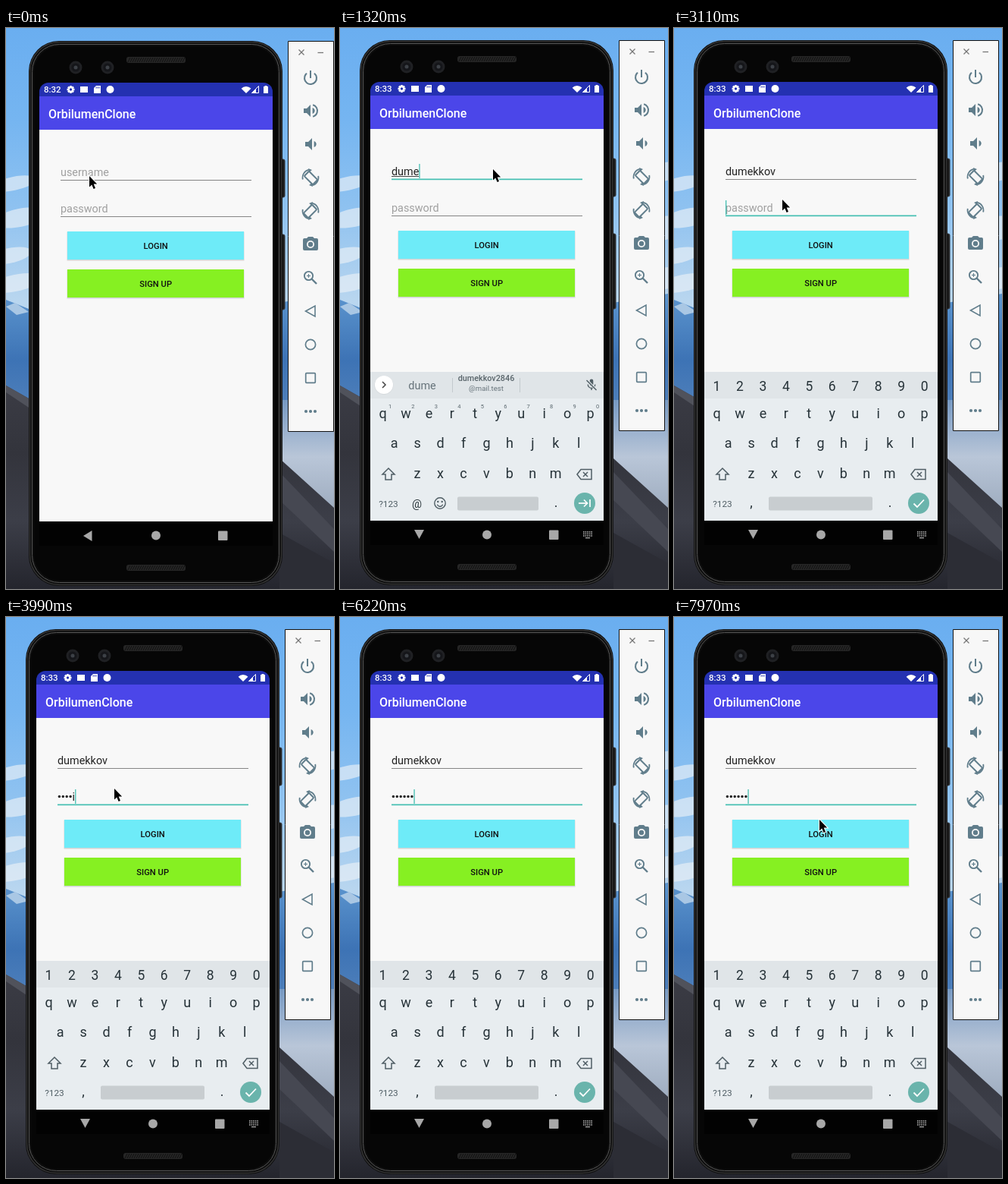
An HTML page with a canvas for the animation above (8000 ms loop, 433x739 px).

```html
<!DOCTYPE html>
<html lang="en">
<head>
<meta charset="utf-8">
<title>Login demo</title>
<style>
  html, body { margin: 0; width: 100%; height: 100%; overflow: hidden; background: #000; }
  canvas { display: block; width: 433px; height: 739px; }
</style>
</head>
<body>
<canvas id="stage"></canvas>
<script>
const W = 433, H = 739, LOOP = 8000;
const canvas = document.getElementById('stage');
const c = canvas.getContext('2d');
const ratio = window.devicePixelRatio || 1;
canvas.width = W * ratio;
canvas.height = H * ratio;

const TITLE = 'OrbilumenClone', USER = 'dumekkov', MAIL = ['dumekkov2846', '@mail.test'];
const TEAL = '#45bfb2', SLATE = '#607d8b', INK = '#263238', KEY = '#4f5d64';

// Each step holds until the next one; values carry over.
const steps = [
  { at: 0, cursor: [110, 195], typed: 0, dots: 0, char: '', focus: '', keys: '', caret: false },
  { at: 150, cursor: [178, 381] },
  { at: 290, cursor: [361, 661] },
  { at: 590, cursor: [366, 690] },
  { at: 740, cursor: [374, 719] },
  { at: 880, cursor: null },
  { at: 1320, cursor: [202, 186], typed: 4, focus: 'user', keys: 'text', caret: true },
  { at: 1620, typed: 5 },
  { at: 1770, typed: 7 },
  { at: 1910, typed: 8 },
  { at: 2210, cursor: [190, 196] },
  { at: 2360, cursor: [157, 218], caret: false },
  { at: 2510, cursor: [143, 229] },
  { at: 2660, cursor: [143, 226], focus: 'pass', caret: true },
  { at: 3110, keys: 'pass' },
  { at: 3260, caret: false },
  { at: 3550, char: 'r', caret: true },
  { at: 3700, dots: 2, char: 'e' },
  { at: 3850, dots: 3, char: 'v' },
  { at: 3990, dots: 4, char: 'i' },
  { at: 4290, dots: 5, char: 'd' },
  { at: 4730, cursor: [147, 236], caret: false },
  { at: 4880, cursor: [160, 258] },
  { at: 5030, cursor: [175, 276], caret: true },
  { at: 5180, cursor: [183, 283] },
  { at: 5770, dots: 6, char: '' },
  { at: 6070, cursor: [258, 262], caret: false },
  { at: 6220, cursor: null, caret: true },
  { at: 6660, cursor: [410, 319], caret: false },
  { at: 6810, cursor: [262, 284] },
  { at: 6950, cursor: [192, 267], caret: true },
  { at: 7400, caret: false },
  { at: 7850, caret: true }
];
const stateAt = t => Object.assign({}, ...steps.filter(s => s.at <= t));

function rect(x, y, w, h, fill) {
  c.fillStyle = fill;
  c.fillRect(x, y, w, h);
}
function round(x, y, w, h, r, fill, stroke, lw = 1) {
  c.beginPath();
  c.roundRect(x, y, w, h, r);
  if (fill) { c.fillStyle = fill; c.fill(); }
  if (stroke) { c.strokeStyle = stroke; c.lineWidth = lw; c.stroke(); }
}
function disc(x, y, r, fill) {
  c.beginPath();
  c.arc(x, y, r, 0, 7);
  c.fillStyle = fill;
  c.fill();
}
function arc(x, y, r, from, to, color, lw) {
  c.beginPath();
  c.arc(x, y, r, from, to);
  c.strokeStyle = color;
  c.lineWidth = lw;
  c.stroke();
}
function trace(pts, x = 0, y = 0, close = false) {
  c.beginPath();
  for (let i = 0; i < pts.length; i += 2) c.lineTo(x + pts[i], y + pts[i + 1]);
  if (close) c.closePath();
}
function poly(pts, fill, x, y) {
  trace(pts, x, y, true);
  c.fillStyle = fill;
  c.fill();
}
function line(pts, color, lw, x, y, close) {
  trace(pts, x, y, close);
  c.strokeStyle = color;
  c.lineWidth = lw;
  c.stroke();
}
function text(s, x, y, size, color, align = 'left', weight = 400) {
  c.font = `${weight} ${size}px Roboto, sans-serif`;
  c.textAlign = align;
  c.fillStyle = color;
  c.fillText(s, x, y);
  return c.measureText(s).width;
}
function blend(y0, y1, ...stops) {
  const g = c.createLinearGradient(0, y0, 0, y1);
  stops.forEach((s, i) => g.addColorStop(i / (stops.length - 1), s));
  return g;
}
function at(x, y, angle, draw) {
  c.save();
  c.translate(x, y);
  c.rotate(angle);
  draw();
  c.restore();
}

function drawBackdrop() {
  rect(0, 0, W, H, blend(0, 360, '#6aaef0', '#75b5f1', '#8fc2f0', '#b9d6ef'));
  const clouds = [10, 205, 30, 9, 18, 250, 34, 12, 4, 300, 30, 10, 12, 336, 36, 11,
    425, 190, 40, 12, 420, 265, 40, 16, 428, 330, 40, 14];
  c.fillStyle = 'rgba(235,241,247,.65)';
  for (let i = 0; i < clouds.length; i += 4) {
    c.beginPath();
    c.ellipse(clouds[i], clouds[i + 1], clouds[i + 2], clouds[i + 3], -0.2, 0, 7);
    c.fill();
  }
  poly([0, 358, 30, 370, 200, 390, 360, 362, 433, 350, 433, 600, 0, 600], blend(355, 520, '#5a93cd', '#3d73b5', '#5584bc'));
  poly([0, 367, 12, 362, 30, 374, 14, 378], '#a9c7e4');
  rect(350, 490, 83, 160, blend(490, 640, '#7799c2', '#b9c6d8', '#9caabd'));
  poly([0, 471, 30, 488, 120, 540, 300, 540, 361, 567, 433, 632, 433, 739, 0, 739],
    blend(470, 739, '#3b3c45', '#33343c', '#3c3e48', '#24252d'));
  poly([0, 471, 30, 488, 30, 500, 0, 480], '#50525b');
  poly([361, 585, 433, 660, 433, 690, 361, 622], '#464852');
  poly([361, 665, 433, 705, 433, 739, 361, 739], '#2c2d35');
}

function drawPhone() {
  for (const [y, h] of [[172, 50], [271, 99]]) round(358, y, 6, h, 2, '#1b1b1b', '#3a3a3a');
  round(26, 16, 335, 718, 40, '#0d0d0d');
  round(27.5, 17.5, 332, 715, 39, null, '#343434', 1.5);
  round(30.5, 20.5, 326, 709, 36, null, '#565656', 1);
  round(33, 23, 321, 704, 34, '#060606');
  for (const y of [37, 706]) {
    round(155, y, 78, 8, 3, '#262626');
    for (let x = 157; x < 232; x += 3) line([x, y + 7, x + 3, y + 1], '#101010', 1);
  }
  for (const x of [88, 130]) {
    disc(x, 51, 8.5, '#202124');
    disc(x, 51, 5.5, '#15161a');
    disc(x, 51, 2.5, '#3d4147');
  }
}

function drawStatus(clock) {
  round(40, 71, 308, 30, [12, 12, 0, 0], '#2431b1');
  rect(40, 89, 308, 44, '#4b46e9');
  text(clock, 46, 84, 11.5, '#fff', 'left', 500);
  for (let i = 0; i < 8; i++) at(81.5, 80, i * Math.PI / 4, () => rect(-1.3, -5, 2.6, 3, '#fff'));
  arc(81.5, 80, 2.7, 0, 7, '#fff', 2);
  rect(94, 76, 10, 8, '#fff');
  poly([115, 75, 121, 75, 121, 85, 112, 85, 112, 78], '#fff');
  for (const x of [115, 117, 119]) rect(x - .4, 76.5, 1, 2, '#2431b1');
  disc(133.5, 80, 5, '#fff');
  c.beginPath();
  c.moveTo(313, 85);
  c.arc(313, 85, 9, -2.36, -0.78);
  c.fillStyle = '#fff';
  c.fill();
  line([320.5, 84.5, 329.5, 84.5, 329.5, 75.5], '#fff', 1, 0, 0, true);
  poly([320, 85, 326, 85, 326, 79], '#fff');
  rect(336, 76, 6, 9, '#fff');
  rect(337.5, 75, 3, 1, '#fff');
  text(TITLE, 52, 118, 16, '#fff', 'left', 500);
}

function field(y, focused) {
  rect(68, focused ? y - .5 : y, 252, focused ? 1.7 : 1, focused ? TEAL : '#858585');
}
function button(label, y, fill) {
  rect(76.5, y + .5, 234, 38, '#d2d5d6');
  rect(77, y, 233, 37, fill);
  text(label, 193.7, y + 23, 11.2, '#111', 'center', 500);
}

function drawForm(s) {
  rect(40, 133, 308, 516, '#f8f8f8');
  const name = USER.slice(0, s.typed);
  const w = text(name || 'username', 68, 193.5, 14.4, name ? '#222' : '#a0a0a0');
  field(199, s.focus === 'user');
  if (s.focus === 'user') {
    rect(68, 195, w, 1, '#444');
    if (s.caret) rect(68 + w, 179, 1.3, 19, TEAL);
  }
  let x = 68;
  if (s.dots || s.char) {
    for (let i = 0; i < s.dots; i++) disc(70.4 + i * 4.9, 236.5, 1.7, '#222');
    x += s.dots * 4.9;
    if (s.char) x += text(s.char, x, 241.5, 14.4, '#222');
  } else {
    text('password', 68, 241.5, 14.4, '#a0a0a0');
  }
  field(247, s.focus === 'pass');
  if (s.focus === 'pass' && s.caret) rect(x, 227, 1.3, 19, TEAL);
  button('LOGIN', 267, '#6eebf8');
  button('SIGN UP', 317, '#86f022');
}

function letters(row, x, y, size = 18) {
  [...row].forEach((k, i) => text(k, x + i * 30.45, y, size, INK, 'center'));
}

function drawSuggestions(s) {
  disc(58, 470.5, 12.5, '#d5dadd');
  disc(58, 470, 12, '#fff');
  line([56, 466, 60, 470, 56, 474], '#444', 1.5);
  text(USER.slice(0, s.typed), 108.5, 476, 14.4, '#66737a', 'center');
  rect(148, 461, 1, 19, '#c3c9cd');
  rect(237, 461, 1, 19, '#c3c9cd');
  text(MAIL[0], 193, 465, 10.8, '#59656b', 'center', 500);
  text(MAIL[1], 193, 478, 9.6, '#66737a', 'center');
  round(329.7, 462.5, 4.6, 9, 2.3, KEY);
  arc(332, 469.5, 4.8, 0, Math.PI, KEY, 1.3);
  rect(331.3, 474, 1.4, 3, KEY);
  line([326, 464, 339, 477], '#e0e5e8', 3);
  line([325.5, 464, 338.5, 477], KEY, 1.4);
}

function drawKeyboard(s) {
  const plain = s.keys === 'text';
  rect(40, 453, 308, 196, '#e8edf0');
  rect(40, 453, 308, 35, '#e0e5e8');
  if (plain) drawSuggestions(s);
  else letters('1234567890', 56.5, 477.5, 17.5);
  letters('qwertyuiop', 56.5, 514);
  if (plain) [...'1234567890'].forEach((k, i) => text(k, 66 + i * 30.45, 501, 7.5, '#59666d', 'center'));
  letters('asdfghjkl', 71.7, 553);
  letters('zxcvbnm', 102, 593);
  line([64, 580, 72, 588, 68, 588, 68, 595, 60, 595, 60, 588, 56, 588], KEY, 1.5, 0, 0, true);
  line([313, 588, 318, 581.5, 332, 581.5, 332, 594.5, 318, 594.5], KEY, 1.5, 0, 0, true);
  line([321, 585, 327, 591], KEY, 1.5);
  line([327, 585, 321, 591], KEY, 1.5);
  text('?123', 64, 630.5, 11.8, KEY, 'center');
  if (plain) {
    text('@', 101.5, 631.5, 14.5, INK, 'center');
    arc(132, 626, 7.2, 0, 7, KEY, 1.4);
    disc(129.3, 624, 1.2, KEY);
    disc(134.7, 624, 1.2, KEY);
    arc(132, 626.5, 3.8, 0.3, 2.84, KEY, 1.4);
  } else {
    text(',', 102, 631, 18, INK, 'center');
  }
  const left = plain ? 155 : 125;
  round(left, 617.5, 262 - left, 18, 2, '#c8cdd0');
  text('.', 285, 631, 18, INK, 'center');
  disc(323, 626, 14, '#6ab4ac');
  if (plain) {
    line([315, 626, 326, 626], '#fff', 1.7);
    line([322, 621.5, 326.5, 626, 322, 630.5], '#fff', 1.7);
    line([330, 621, 330, 631], '#fff', 1.7);
  } else {
    line([316.5, 626.5, 321, 631, 330, 621.5], '#fff', 1.8);
  }
}

function drawNav(keys) {
  const grey = '#a8a8a8';
  rect(40, 649, 308, 32, '#020202');
  poly(keys ? [98, 661, 111, 661, 104.5, 673] : [98, 668, 109.5, 661, 109.5, 675], grey);
  disc(194, 667.5, 6, grey);
  round(276, 661.5, 12.5, 12.5, 1, grey);
  if (!keys) return;
  for (let r = 0; r < 3; r++)
    for (let i = 0; i < 5; i++) rect(321 + i * 2.6, 663 + r * 2.6, 1.6, 1.6, grey);
  rect(324, 671, 6, 1.3, grey);
}

function speaker(x, y) {
  poly([0, -3, 4, -3, 9, -8, 9, 8, 4, 3, 0, 3], SLATE, x, y);
}
function rotator(y, flip) {
  c.save();
  c.translate(398, y);
  c.scale(flip, 1);
  at(0.5, 0.5, -Math.PI / 4, () => round(-4.5, -8, 9, 16, 1.2, null, SLATE, 2));
  arc(0, 0, 10.5, 2.9, 4.5, SLATE, 1.7);
  arc(0, 0, 10.5, -0.2, 1.35, SLATE, 1.7);
  poly([-3, -12, 2, -10, -2, -7], SLATE);
  poly([3, 12, -2, 10, 2, 7], SLATE);
  c.restore();
}

function drawPanel() {
  round(368.5, 16.5, 60, 514, 0, '#f7f7f7', '#111');
  line([382.5, 27.5, 389.5, 34.5], '#777', 1.3);
  line([389.5, 27.5, 382.5, 34.5], '#777', 1.3);
  line([407.5, 31.5, 415, 31.5], '#777', 1.3);
  arc(398, 65, 8, -0.9, 4.04, SLATE, 2.1);
  rect(397, 55, 2, 10, SLATE);
  speaker(389, 108);
  disc(400, 108, 0, SLATE);
  c.beginPath();
  c.arc(399.5, 108, 4.2, -1.3, 1.3);
  c.fillStyle = SLATE;
  c.fill();
  arc(399, 108, 8, -1.3, 1.3, SLATE, 2);
  speaker(391, 152);
  c.beginPath();
  c.arc(401.5, 152, 4.2, -1.3, 1.3);
  c.fill();
  rotator(196, 1);
  rotator(240, -1);
  round(388, 276, 20, 16, 2, SLATE);
  poly([393, 276, 395, 274, 401, 274, 403, 276], SLATE);
  disc(398, 284, 5, '#f7f7f7');
  disc(398, 284, 3.2, SLATE);
  arc(395.5, 325.5, 5.6, 0, 7, SLATE, 1.9);
  line([399.5, 329.5, 406, 336], SLATE, 2.4);
  line([393, 325.5, 398, 325.5], SLATE, 1.1);
  line([395.5, 323, 395.5, 328], SLATE, 1.1);
  line([391.5, 372, 404, 365, 404, 379], SLATE, 1.6, 0, 0, true);
  arc(398, 416, 6.6, 0, 7, SLATE, 1.7);
  round(391.7, 453.7, 12.6, 12.6, 1, null, SLATE, 1.7);
  for (const x of [392, 398, 404]) disc(x, 504, 2.1, SLATE);
}

function drawCursor([x, y]) {
  const shape = [0, 0, 0, 14.5, 3.3, 11.5, 5.6, 17, 8, 16, 5.7, 10.6, 10.2, 10.6];
  line(shape, '#fff', 2, x, y, true);
  poly(shape, '#000', x, y);
}

function render(t) {
  const s = stateAt(t);
  c.setTransform(ratio, 0, 0, ratio, 0, 0);
  drawBackdrop();
  c.save();
  if (!s.keys) c.translate(4, 1);
  drawPhone();
  drawStatus(s.keys ? '8:33' : '8:32');
  drawForm(s);
  if (s.keys) drawKeyboard(s);
  drawNav(s.keys);
  drawPanel();
  c.restore();
  if (s.cursor) drawCursor(s.cursor);
}

const start = performance.now();
function tick() {
  render((performance.now() - start) % LOOP);
  requestAnimationFrame(tick);
}
tick();
</script>
</body>
</html>
```
